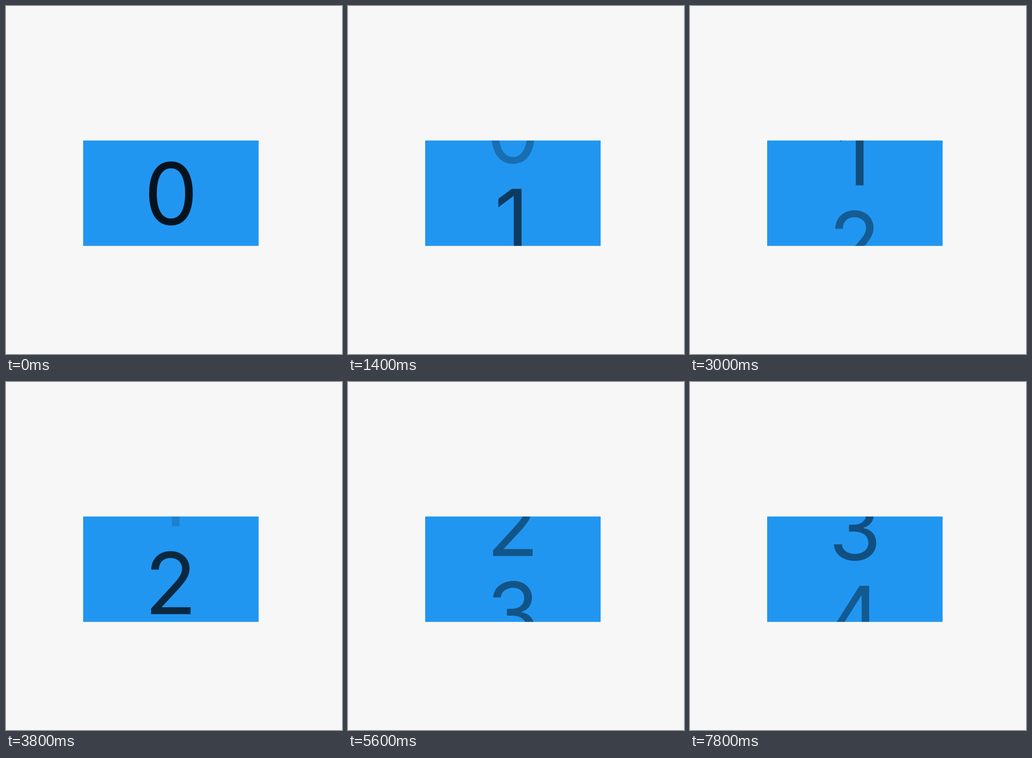
Write an HTML page with a canvas that moves like this. It is 688 by 712 pixels and loops after 8 s.

```html
<!DOCTYPE html>
<html lang="en">
<head>
<meta charset="utf-8">
<title>Rolling counter</title>
<style>
  html, body { margin: 0; width: 100%; height: 100%; overflow: hidden; background: #f7f7f7; }
  canvas { display: block; }
</style>
</head>
<body>
<canvas id="stage" width="688" height="712"></canvas>
<script>
const ctx = document.getElementById('stage').getContext('2d');
const LOOP = 8000, STEP = 200;
const BOX = [158, 275.2, 359.3, 215.6];
const BASELINE = 446.6, DIGIT_HEIGHT = 180;
// Horizontal middle of each digit's ink
const CENTERS = [337.75, 331.75, 337.6, 338, 338];

// [time in ms, counter value], linear in between
const KEYS = [
  [0, 0], [2000, 1], [2120, 1], [4120, 2], [4600, 2],
  [5600, 2.505], [6600, 2.986], [6630, 3], [6884, 3], [8884, 4]
];

function valueAt(time) {
  const next = KEYS.findIndex(([t]) => t > time);
  const [t0, v0] = KEYS[next - 1], [t1, v1] = KEYS[next];
  return v0 + (v1 - v0) * (time - t0) / (t1 - t0);
}

function drawDigit(digit, offset, opacity) {
  if (opacity <= 0) return;
  const ink = ctx.measureText(digit);
  const x = CENTERS[digit] + (ink.actualBoundingBoxLeft - ink.actualBoundingBoxRight) / 2;
  ctx.fillStyle = `rgba(0, 0, 0, ${0.87 * opacity})`;
  ctx.fillText(digit, x, BASELINE + offset * DIGIT_HEIGHT);
}

function draw(time) {
  const value = valueAt(time);
  const digit = Math.floor(value), part = value - digit;
  ctx.fillStyle = '#f7f7f7';
  ctx.fillRect(0, 0, 688, 712);
  ctx.fillStyle = '#2196f1';
  ctx.fillRect(...BOX);

  ctx.save();
  ctx.beginPath();
  ctx.rect(...BOX);
  ctx.clip();
  ctx.font = '400 174.4px Inter, sans-serif';
  drawDigit(digit, -part, 1 - part);
  drawDigit(digit + 1, 1 - part, part);
  ctx.restore();
}

let start;
function tick(now) {
  start ??= now;
  draw(Math.floor((now - start) % LOOP / STEP) * STEP);
  requestAnimationFrame(tick);
}
draw(0);
requestAnimationFrame(tick);
</script>
</body>
</html>
```
